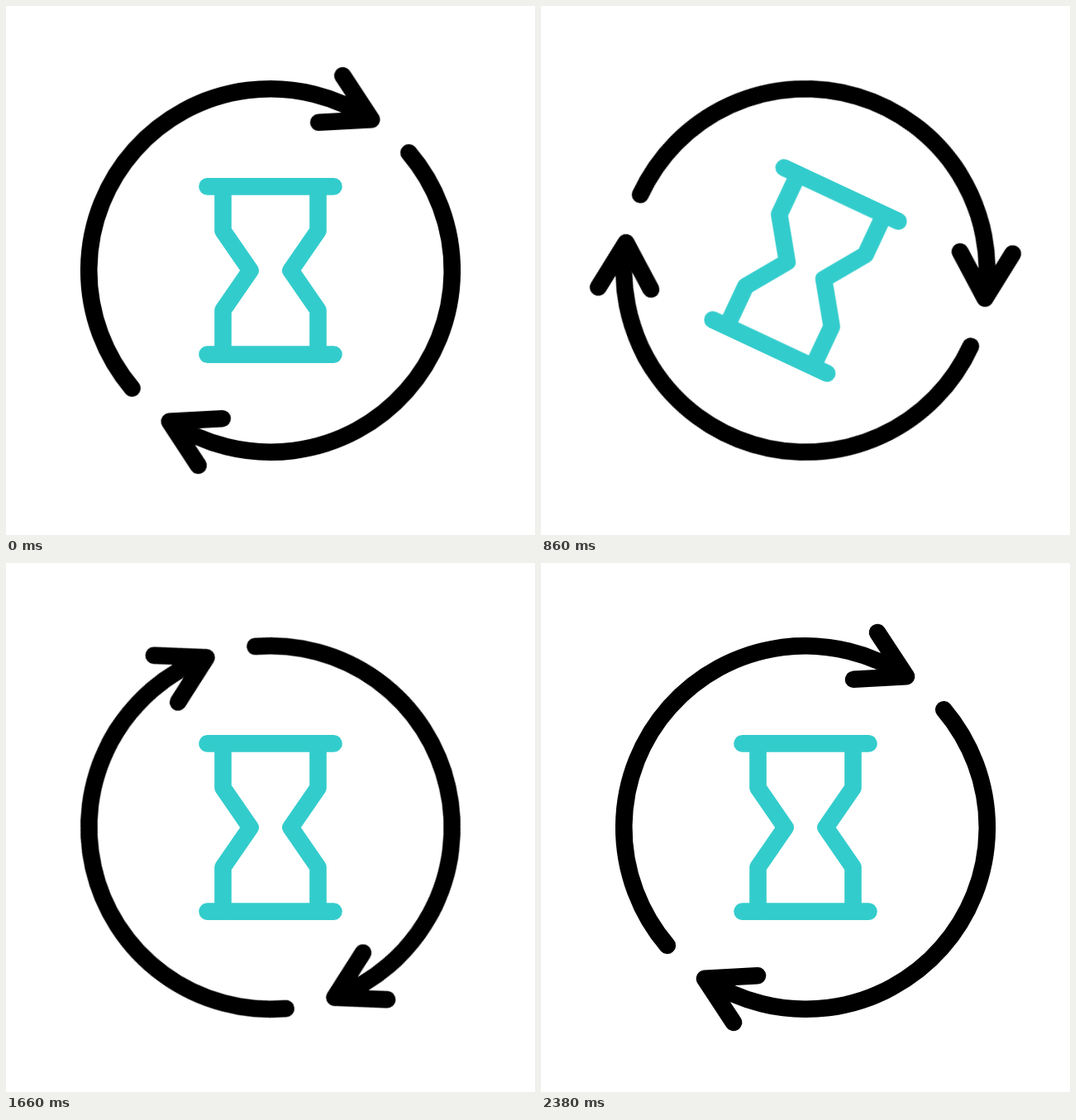
An HTML page that plays this animation: 640 px wide and 640 px high, repeating every 2400 ms.

```html
<!DOCTYPE html>
<html lang="en">
<head>
<meta charset="utf-8">
<title>Turning hourglass</title>
<style>
  html, body { margin: 0; width: 100%; height: 100%; overflow: hidden; background: #fff; }
  svg { display: block; width: 100%; height: 100%; }
  g { fill: none; stroke-width: 20.6; stroke-linecap: round; stroke-linejoin: round; }
  .ring { stroke: #000; animation: ring 2.4s linear infinite; }
  .glass { stroke: #3cc; animation: glass 2.4s infinite; }

  /* Both shapes have half-turn symmetry, so 180° closes the loop. */
  @keyframes ring {
    from { transform: rotate(0deg); }
    99.1667%, to { transform: rotate(180deg); }
  }
  @keyframes glass {
    from { transform: rotate(0deg); animation-timing-function: cubic-bezier(.5, 0, .5, 1); }
    50%, to { transform: rotate(-180deg); }
  }
</style>
</head>
<body>
<svg viewBox="-320 -320 640 640">
  <defs>
    <path id="arrow" d="M-167.2 142.7A219.8 219.8 0 0 1 122 -182.8M87 -236L122 -182.8L58 -179.2"/>
    <path id="half" d="M-76.5 -101.6H76.5M-57.5 -101.6V-48L-24.4 0L-57.5 48V101.6"/>
  </defs>
  <g class="ring">
    <use href="#arrow"/>
    <use href="#arrow" transform="rotate(180)"/>
  </g>
  <g class="glass">
    <use href="#half"/>
    <use href="#half" transform="rotate(180)"/>
  </g>
</svg>
</body>
</html>
```
